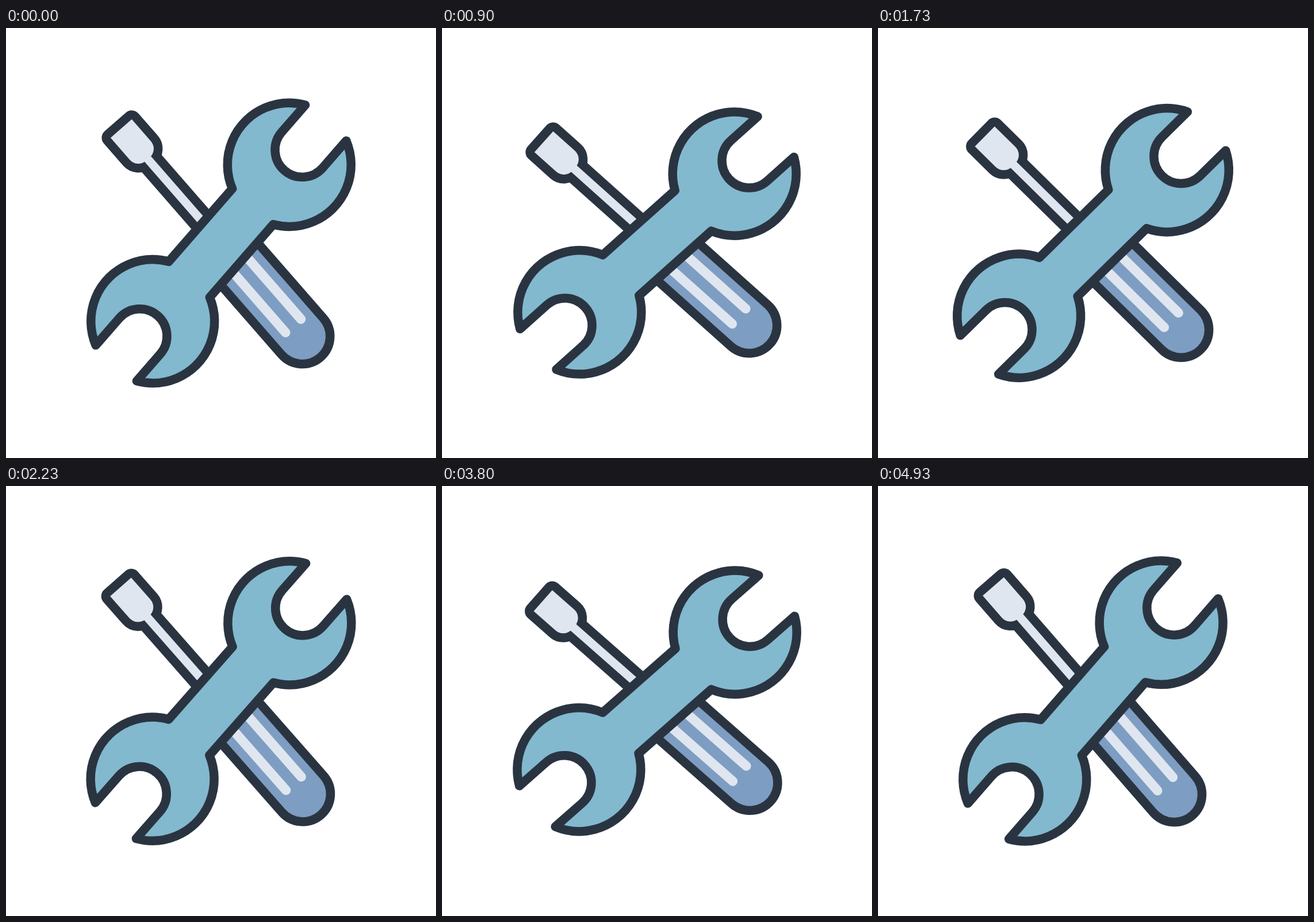
An HTML page with a canvas that plays this animation: 748x748 px, repeating every 5.01 s.

```html
<!DOCTYPE html>
<html lang="en">
<head>
<meta charset="utf-8">
<title>Wrench and screwdriver</title>
<style>
html, body { margin: 0; width: 100%; height: 100%; overflow: hidden; background: #fff; }
canvas { display: block; width: 748px; height: 748px; }
</style>
</head>
<body>
<canvas id="stage" width="748" height="748"></canvas>
<script>
const ctx = document.getElementById('stage').getContext('2d');
const CENTER = 374, LOOP = 5010, LAST_STEP = 4930;
const SWING = 4, PERIOD = 2480, PEAK = 2395;
const LINE = 15.5;
const INK = '#2a3441', TEAL = '#82b9cf', BLUE = '#7e9dc2', PALE = '#dfe6f0';

// Both tools lie along the local x axis, centred on the origin.
function wrenchPath() {
  const path = new Path2D();
  const headX = 180.7, radius = 107.5, half = 47.3, mouthX = 215;
  const spread = Math.asin(half / radius);
  for (const turn of [0, Math.PI]) {
    const head = new Path2D();
    head.arc(headX, 0, radius, Math.PI + spread, -spread);
    head.arc(mouthX, 0, half, -Math.PI / 2, Math.PI / 2, true);
    head.arc(headX, 0, radius, spread, Math.PI - spread);
    if (turn) continue;
    path.arc(headX, 0, radius, Math.PI + spread, 2 * Math.PI - spread);
    path.arc(mouthX, 0, half, 1.5 * Math.PI, Math.PI / 2, true);
    path.arc(headX, 0, radius, spread, Math.PI - spread);
  }
  path.arc(-headX, 0, radius, spread, Math.PI - spread);
  path.arc(-mouthX, 0, half, Math.PI / 2, 1.5 * Math.PI, true);
  path.arc(-headX, 0, radius, Math.PI + spread, 2 * Math.PI - spread);
  path.closePath();
  return path;
}

function bladePath() {
  const path = new Path2D();
  const half = 24.4, start = -264.2, end = -193.5, bend = 20;
  path.moveTo(start, -half);
  path.arcTo(end, -half, end, 0, bend);
  path.arcTo(end, half, start, half, bend);
  path.lineTo(start, half);
  path.closePath();
  return path;
}

function shaftPath() {
  const path = new Path2D();
  path.rect(-205, -7.4, 205, 14.8);
  return path;
}

function gripPath() {
  const path = new Path2D();
  path.moveTo(0, -40.5);
  path.arc(215.3, 0, 40.5, -Math.PI / 2, Math.PI / 2);
  path.lineTo(0, 40.5);
  path.closePath();
  return path;
}

const wrench = wrenchPath();
const driver = [[bladePath(), PALE], [shaftPath(), PALE], [gripPath(), BLUE]];

function rotated(degrees, draw) {
  ctx.save();
  ctx.translate(CENTER, CENTER);
  ctx.rotate(degrees * Math.PI / 180);
  draw();
  ctx.restore();
}

function drawDriver() {
  ctx.strokeStyle = INK;
  ctx.lineWidth = 2 * LINE;
  for (const [path] of driver) ctx.stroke(path);
  for (const [path, color] of driver) {
    ctx.fillStyle = color;
    ctx.fill(path);
  }
  ctx.strokeStyle = PALE;
  ctx.lineWidth = 16.5;
  for (const y of [-17.7, 17.7]) {
    ctx.beginPath();
    ctx.moveTo(20, y);
    ctx.lineTo(191.3, y);
    ctx.stroke();
  }
}

function drawWrench() {
  ctx.fillStyle = TEAL;
  ctx.fill(wrench);
  ctx.strokeStyle = INK;
  ctx.lineWidth = LINE;
  ctx.stroke(wrench);
}

// Steps alternate between 30 and 70 ms; the last one is held to the loop's end.
function stepTime(ms) {
  const rest = ms % 100;
  return Math.min(ms - rest + (rest < 30 ? 0 : 30), LAST_STEP);
}

function render(now) {
  const time = stepTime(now % LOOP);
  const angle = 45 + SWING * Math.cos(2 * Math.PI * (time - PEAK) / PERIOD);
  ctx.fillStyle = '#fff';
  ctx.fillRect(0, 0, 748, 748);
  ctx.lineJoin = ctx.lineCap = 'round';
  rotated(angle, drawDriver);
  rotated(-angle, drawWrench);
}

let begin;
function tick(now) {
  begin ??= now;
  render(now - begin);
  requestAnimationFrame(tick);
}
render(0);
requestAnimationFrame(tick);
</script>
</body>
</html>
```
